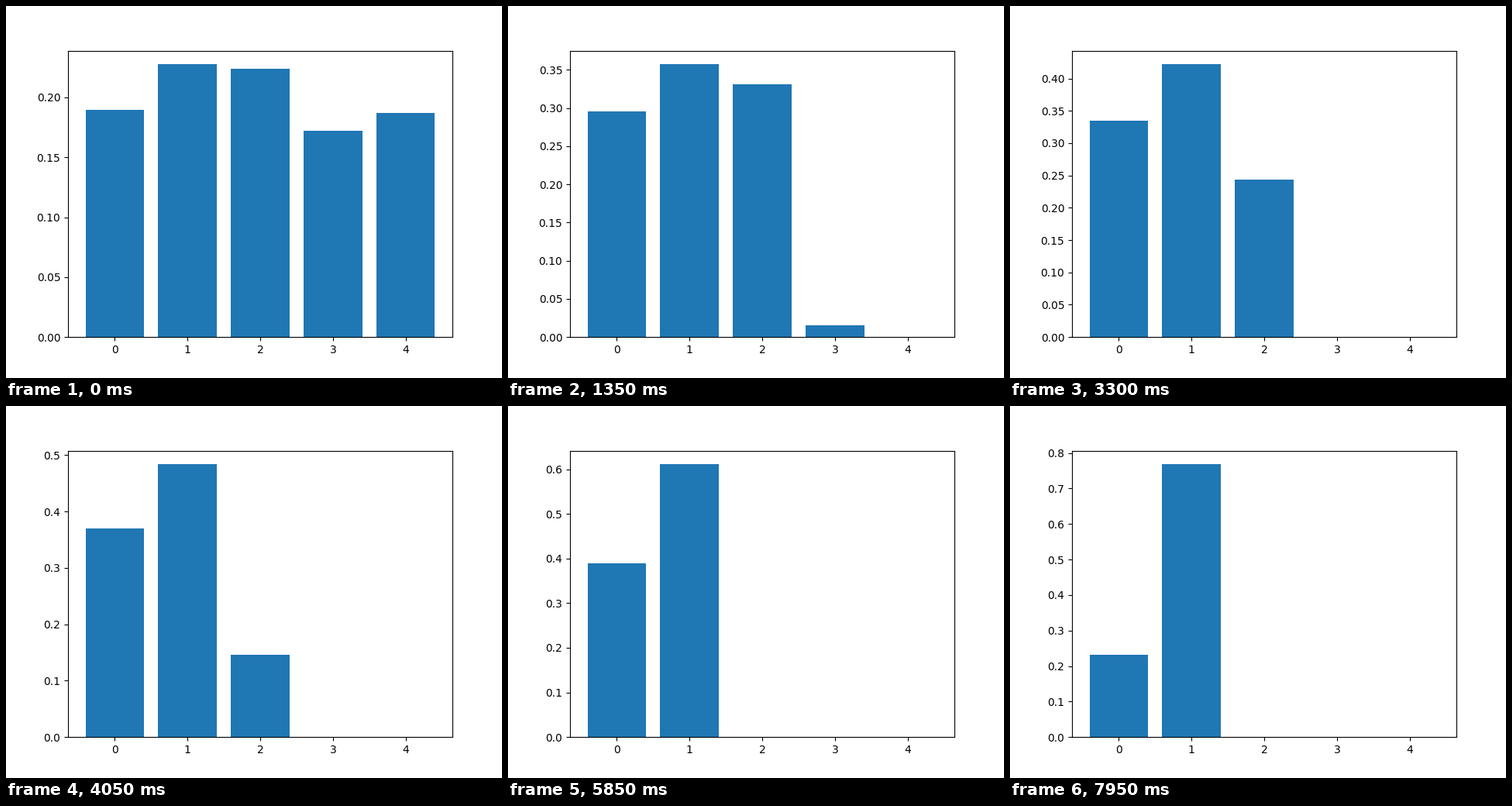
A matplotlib script for the animation above (8000 ms loop, 640 by 480 pixels).

```python
import numpy as np
import matplotlib.pyplot as plt
from matplotlib.animation import FuncAnimation

TICK_MS = 50
TICKS_PER_STEP = 3
TICKS = 160

# Each bar's size relative to bar 1, the step at which it dies out,
# and how much of its decay is quadratic rather than quartic.
START = np.array([0.832, 1, 0.983, 0.7563, 0.8217])
DEATH = np.array([60.4, np.inf, 31, 9.2, 5.2])
QUADRATIC = np.array([0.25, 1, 0.64, 0.65, 0.93])


def shares(step):
    age = np.minimum(step / DEATH, 1)
    decay = QUADRATIC * age**2 + (1 - QUADRATIC) * age**4
    sizes = START * (1 - decay)
    return sizes / sizes.sum()


fig, ax = plt.subplots(figsize=(6.4, 4.8), dpi=100)
bars = ax.bar(range(5), shares(0))


def update(tick):
    heights = shares(tick // TICKS_PER_STEP)
    for bar, height in zip(bars, heights):
        bar.set_height(height)
    ax.set_ylim(0, 1.05 * heights.max())
    return bars


anim = FuncAnimation(fig, update, frames=TICKS, interval=TICK_MS,
                     init_func=lambda: update(0), repeat=True, repeat_delay=0)
plt.show()
```
